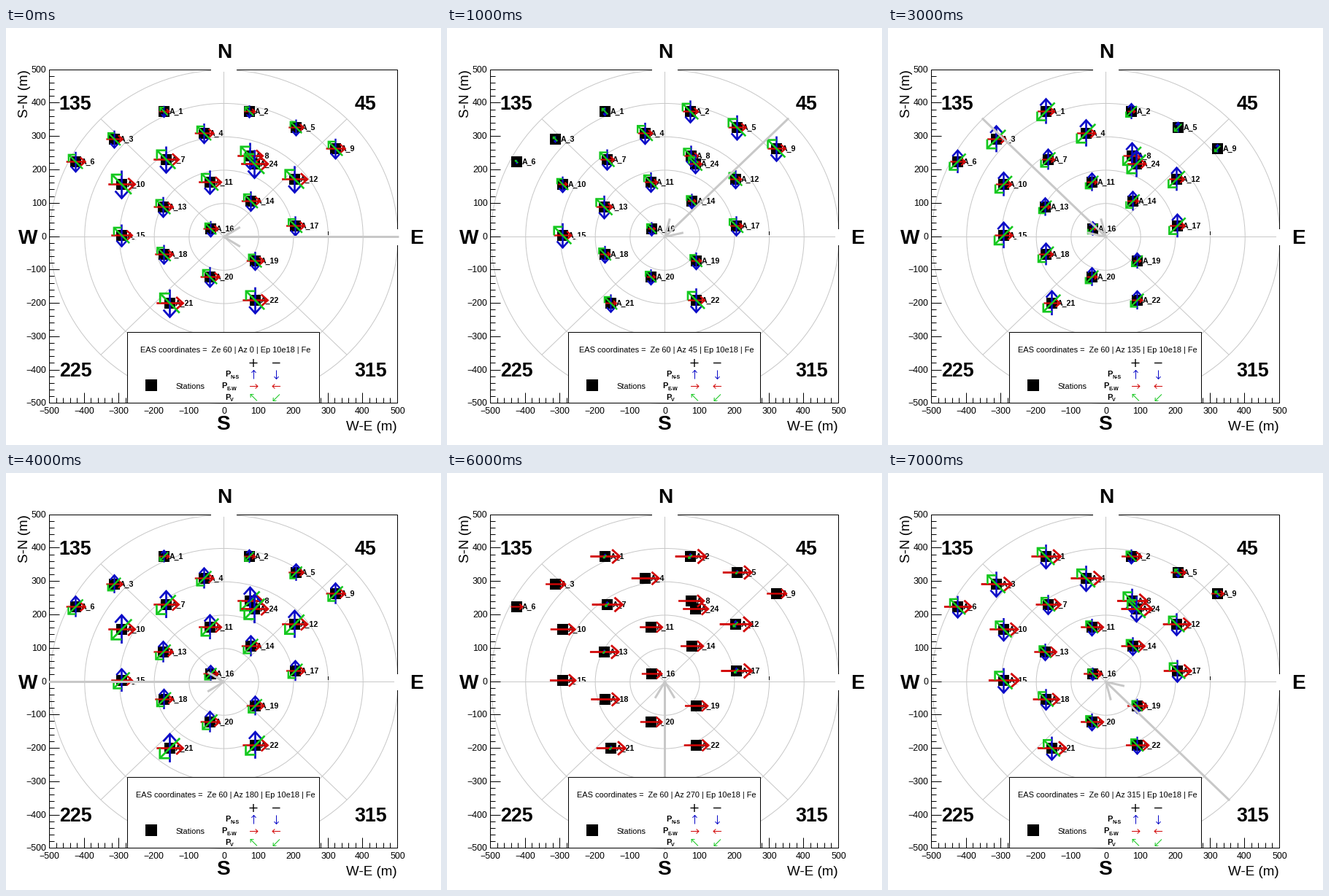
Recreate the animation shown at these times as a matplotlib script. Size 596 px wide and 572 px high, loop 8 s.

```python
import math

import matplotlib.pyplot as plt
import numpy as np
from matplotlib.animation import FuncAnimation
from matplotlib.collections import LineCollection
from matplotlib.patches import Ellipse, Rectangle

W, H, DPI = 596, 572, 100
PX = 72 / DPI
CX, CY = W / 2, H / 2
SX, SY = 0.8 * W / 1000, 0.8 * H / 1000  # pixels per metre
BLUE, RED, GREEN, GRAY = "#0a0ac8", "#d20505", "#14c81e", "#c8c8c8"

SPOTS = [(216, 114), (333, 114), (148, 152), (271, 144), (397, 136), (95, 183),
         (219, 180), (334, 175), (451, 165), (158, 214), (279, 211), (395, 207),
         (215, 245), (335, 237), (158, 284), (280, 275), (396, 271), (216, 310),
         (341, 319), (279, 341), (224, 377), (341, 373), (340, 186)]

plt.rcParams["font.family"] = "Liberation Sans"
plt.rcParams["path.snap"] = False
fig = plt.figure(figsize=(W / DPI, H / DPI), dpi=DPI, facecolor="white")
ax = fig.add_axes([0, 0, 1, 1])
ax.set_xlim(0, W)
ax.set_ylim(H, 0)
ax.axis("off")


def text(x, y, s, size, ha="center", bold=False, z=5):
    return ax.text(x, y + 0.345 * size, s, fontsize=size * PX, ha=ha,
                   va="baseline", weight="bold" if bold else "normal", zorder=z)


def line(xs, ys, color="black", lw=1.0, z=4):
    ax.plot(xs, ys, color=color, lw=lw * PX, zorder=z, solid_capstyle="butt")


def box(x0, y0, x1, y1, z, fc="white", ec="none"):
    ax.add_patch(Rectangle((x0, y0), x1 - x0, y1 - y0, fc=fc, ec=ec,
                           lw=PX, zorder=z))


def pixel(v):
    """Centre of the pixel that holds v."""
    return math.floor(v + 1e-6) + 0.5


def arrow(x, y, dx, dy, wing, half_deg):
    """Open arrow centred on x, y that reaches dx, dy to its tip."""
    tip = (x + dx, y + dy)
    back = math.atan2(-dy, -dx)
    ends = [(tip[0] + wing * math.cos(back + a), tip[1] + wing * math.sin(back + a))
            for a in (math.radians(half_deg), -math.radians(half_deg))]
    return [[(x - dx, y - dy), tip], [ends[0], tip, ends[1]]]


def polar_grid():
    for r in range(100, 501, 100):
        ax.add_patch(Ellipse((CX + .5, CY + .5), 2 * r * SX, 2 * r * SY, fc="none",
                             ec=GRAY, lw=PX, zorder=1))
    for deg in range(0, 180, 45):
        a = math.radians(deg)
        u, v = 500 * SX * math.cos(a), 500 * SY * math.sin(a)
        line([CX + .5 - u, CX + .5 + u], [CY + .5 - v, CY + .5 + v], GRAY, z=1)
    line([441.5, 441.5], [279, 284])


def frame_axes():
    box(59.5, 57.5, 536.5, 514.5, 2, fc="none", ec="black")
    for m in range(-500, 501, 20):
        x, y = pixel(CX + m * SX), pixel(CY - m * SY)
        n = 7 if m % 100 else 14
        line([x, x], [514.5, 514.5 - n], z=2)
        line([59.5, 59.5 + n], [y, y], z=2)
        if m % 100 == 0:
            s = str(m).replace("-", "\u2212")
            text(x, 524.5, s, 12.4)
            text(55.5, y - 0.5, s, 12.4, "right")
    box(281, 55, 316, 60, 3)
    box(532, 276, 540, 298, 3)
    text(536, 545.5, "W-E (m)", 18.8, "right")
    ax.text(34, 57, "S-N (m)", fontsize=18.8 * PX, rotation=90,
            ha="right", va="top", zorder=5)
    for x, y, s in [(299, 31.5, "N"), (298, 541, "S"), (30, 286, "W"), (562.5, 286, "E")]:
        text(x, y, s, 28, bold=True)
    for x, y, s in [(95, 103, "135"), (493, 103, "45"), (95, 469, "225"), (500, 469, "315")]:
        text(x, y, s, 26.7, bold=True)


def legend():
    box(166.5, 417.5, 429.5, 514.5, 12, ec="black")
    box(191, 482, 207, 498, 13, fc="black")
    text(232, 491.5, "Stations", 11, "left", z=13)
    line([333.5, 344.5], [459.5] * 2, lw=1.4, z=13)
    line([339, 339], [454, 465], lw=1.4, z=13)
    line([365, 375.5], [459.5] * 2, lw=1.4, z=13)
    rows = [(300, 474.5, "N-S", BLUE, (0, -6), (0, 6)),
            (295, 490.5, "E-W", RED, (5.5, 0), (-5.5, 0)),
            (300, 506, "V", GREEN, (-4.5, -4.5), (-4.5, 4.5))]
    for x, y, sub, color, plus, minus in rows:
        text(x, y, "P", 11, "left", True, 13)
        text(x + 7.2, y + 4, sub, 7, "left", True, 13)
        for cx, d in ((339.5, plus), (370.5, minus)):
            ax.add_collection(LineCollection(
                arrow(cx, y + 1, *d, 4.5, 42), colors=color, linewidths=PX, zorder=13))


def stations():
    for i, (x, y) in enumerate(SPOTS):
        n = i + 1 if i < 22 else 24
        text(x + 7.5, y + .5, f"A_{n}", 10.6, "left", True, 6)
        box(x - 7, y - 7, x + 8, y + 8, 7, fc="black")
    box(176, 286, 193, 290, 6.5)
    line([176, 193], [286.5] * 2, GRAY, z=6.6)


def signal(x, y, a):
    """Strength by distance to the shower axis, peaking on a ring."""
    u, v = (x - CX) / SX, (CY - y) / SY
    along = u * math.cos(a) + v * math.sin(a)
    across = v * math.cos(a) - u * math.sin(a)
    d = math.hypot(across, along / 2)
    return np.interp(d, [0, 125, 220, 270, 385, 480], [10, 14, 19.5, 17, 8, 4])


def scaled(strength, share):
    """Signed length of one component on a logarithmic scale."""
    size = strength + 5 * math.log(max(abs(share), 1e-3))
    return math.copysign(max(size, 0), share)


def field(az):
    a = math.radians(az)
    east, up = 0.82 - 0.8 * math.sin(a), math.cos(a) - 0.05
    segs, colors, widths = [], [], []
    for x, y in SPOTS:
        s = signal(x, y, a)
        n, e, v = (scaled(s, p) for p in (-up, east, up))
        v *= math.sqrt(0.5)
        for dx, dy, color, deg in [(0, -n, BLUE, 42), (e, 0, RED, 42),
                                   (-abs(v), -v, GREEN, 45)]:
            size = math.hypot(dx, dy)
            if size < 2:
                continue
            segs += arrow(x + .5, y + .5, dx, dy, 0.7 * size, deg)
            colors += [color] * 2
            widths += [(1.6 + 0.06 * size) * PX] * 2
    return segs, colors, widths


def shower(az):
    a = math.radians(az)
    u, v = 250 * SX * math.cos(a), -250 * SY * math.sin(a)
    return arrow(CX + .5 + u, CY + .5 + v, -u, -v, 24.5, 31)


polar_grid()
frame_axes()
stations()
legend()
marks = LineCollection([], zorder=8, capstyle="butt", joinstyle="miter")
beam = LineCollection([], colors=GRAY, linewidths=3 * PX, zorder=9,
                      capstyle="projecting", joinstyle="miter")
ax.add_collection(marks, autolim=False)
ax.add_collection(beam, autolim=False)
caption = text(300.5, 441.5, "", 11, z=13)


def update(k):
    az = 45 * (k % 8)
    segs, colors, widths = field(az)
    marks.set_segments([np.array(s) for s in segs])
    marks.set_color(colors)
    marks.set_linewidth(widths)
    beam.set_segments([np.array(s) for s in shower(az)])
    caption.set_text(f"EAS coordinates =  Ze 60 | Az {az} | Ep 10e18 | Fe")
    return marks, beam, caption


anim = FuncAnimation(fig, update, frames=8, interval=1000, repeat=True,
                     repeat_delay=0, blit=False)
plt.show()
```
